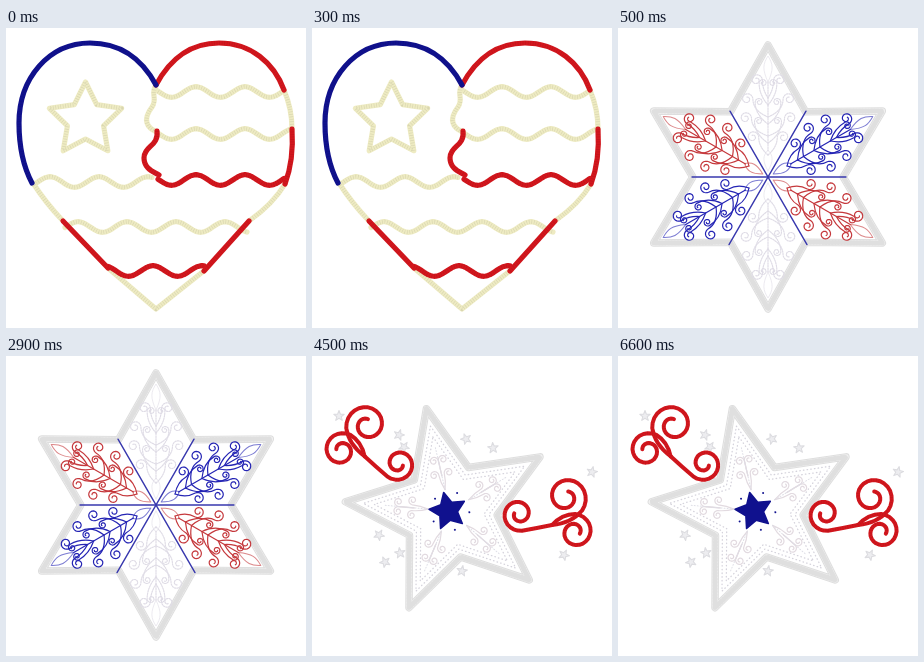
Write an HTML page that moves like this. It is 300 by 300 pixels and loops after 8 s.

```html
<!DOCTYPE html>
<html lang="en">
<head>
<meta charset="utf-8">
<title>Stitched hearts and stars</title>
<style>
  html, body { margin: 0; width: 100%; height: 100%; overflow: hidden; background: #fff; }
  svg { display: block; width: 100%; height: 100%; }
  path { fill: none; stroke-linecap: round; stroke-linejoin: round; }
  .slide { visibility: hidden; animation: 8s step-end infinite; }
  #heart { animation-name: first; }
  #snow { animation-name: second; }
  #star { animation-name: third; }
  @keyframes first { 0% { visibility: visible; } 6.25%, 100% { visibility: hidden; } }
  @keyframes second { 0% { visibility: hidden; } 6.25% { visibility: visible; } 56.25%, 100% { visibility: hidden; } }
  @keyframes third { 0% { visibility: hidden; } 56.25%, 100% { visibility: visible; } }
</style>
</head>
<body>
<svg viewBox="0 0 300 300">
  <g id="heart" class="slide"></g>
  <g id="snow" class="slide"></g>
  <g id="star" class="slide"></g>
</svg>
<script>
const RED = '#d3161d', BLUE = '#10118e', CREAM = '#eeebc2';
const byId = id => document.getElementById(id);
const rad = degrees => degrees * Math.PI / 180;

function add(parent, tag, attrs) {
  const node = document.createElementNS('http://www.w3.org/2000/svg', tag);
  for (const key in attrs) node.setAttribute(key, attrs[key]);
  return parent.appendChild(node);
}
const draw = (parent, d, stroke, width, more) =>
  add(parent, 'path', { d, stroke, 'stroke-width': width, ...more });

const polyline = points =>
  'M' + points.map(([x, y]) => x.toFixed(1) + ' ' + y.toFixed(1)).join('L');

// Satin stitch: a solid line with faint cross threads.
function satin(parent, d, color, width) {
  draw(parent, d, color, width);
  draw(parent, d, '#000', width * .8,
    { 'stroke-dasharray': '.7 1.8', 'stroke-opacity': .09, style: 'stroke-linecap:butt' });
}

function wave(x0, x1, y, crest) {
  const points = [];
  for (let x = x0; x <= x1; x += 2)
    points.push([x, y - 5.3 * Math.cos((x - crest) * 2 * Math.PI / 49)]);
  return polyline(points);
}

// A stem from (x, y) that bends into a spiral around (cx, cy).
function curl(x, y, cx, cy, r, degrees, dir, turns = 1.3) {
  const a0 = rad(degrees);
  const sx = cx + r * Math.cos(a0), sy = cy + r * Math.sin(a0);
  const reach = Math.hypot(sx - x, sy - y) * .5;
  const qx = sx + dir * Math.sin(a0) * reach, qy = sy - dir * Math.cos(a0) * reach;
  const spiral = Array.from({ length: 33 }, (_, i) => {
    const t = i / 32, a = a0 + dir * t * turns * 2 * Math.PI, k = r * (1 - .72 * t);
    return [cx + k * Math.cos(a), cy + k * Math.sin(a)];
  });
  return `M${x} ${y}Q${qx} ${qy} ${sx} ${sy}` + polyline(spiral).replace('M', 'L');
}

function starPath(cx, cy, r, inner, turn = 0, tips = 5) {
  const points = Array.from({ length: tips * 2 }, (_, i) => {
    const a = rad(turn - 90 + i * 180 / tips), k = i % 2 ? r * inner : r;
    return [cx + k * Math.cos(a), cy + k * Math.sin(a)];
  });
  return polyline(points) + 'Z';
}

const drop = (from, to) => {
  const mid = (from + to) / 2;
  return `M0 ${-from}C-6 ${-mid} -5 ${-mid - 5} 0 ${-to}C5 ${-mid - 5} 6 ${-mid} 0 ${-from}`;
};

// Pale padded border with a thread texture.
function border(parent, d) {
  draw(parent, d, '#dedede', 7.5);
  draw(parent, d, '#f1f1f1', 5.5);
  draw(parent, d, '#dfdfdf', 5, { 'stroke-dasharray': '.5 2.6' });
}

function buildHeart(g) {
  const line = (d, color) => satin(g, d, color, 5.2);
  line(starPath(79.5, 92, 38, .5), CREAM);
  line(wave(28, 147, 154, 44), CREAM);
  line(wave(150, 279, 64, 190), CREAM);
  line(wave(150, 285, 106, 190), CREAM);
  line(wave(59, 241, 199, 121), CREAM);
  line('M27 155Q39 174 57 193M102 240L150 281L199 242M243 193Q267 176 279 156', CREAM);
  line('M278 62Q286 81 286 101', CREAM);
  line('M150 57C144 66 152 70 146 79C136 92 141 100 151 104', CREAM);
  line('M57 193L102 240M198 243L243 193', RED);
  line(wave(102, 198, 243, 147), RED);
  line('M151 103C153 118 138 118 138 130C138 140 146 143 153 147', RED);
  line(wave(152, 279, 152, 190), RED);
  line('M286 101Q288 132 279 156', RED);
  line('M150 57C165 29 187 15 213 15C245 15 268 35 278 62', RED);
  line('M150 57C135 29 112 15 84 15C43 15 13 50 13 95C13 115 17 138 26 155', BLUE);
}

function buildSnow(g) {
  border(g, starPath(150, 149, 132, .57, 0, 6));
  const pale = '#dfdce6', blue = '#2424b4', red = '#c5383c';
  [pale, blue, red, pale, blue, red].forEach((color, i) => {
    const petal = add(g, 'g', { transform: `translate(150 149) rotate(${i * 60})` });
    const dash = color === pale ? { 'stroke-dasharray': '1.4 1.2' } : {};
    const line = d => draw(petal, d, color, 1.2, dash);
    for (const side of [1, -1]) {
      const inward = side > 0 ? 180 : 0;
      for (let k = 0; k < 4; k++) {
        const up = 40 + k * 19;
        const out = 23 * Math.sin(Math.PI * (up - 18) / 95);
        line(curl(0, 18 - up, side * out, -up, 6, inward, side));
        if (k) line(curl(0, 25 - up, side * out * .42, 3 - up, 4, 180 - inward, -side));
      }
    }
    line('M0 -26V-95');
    for (const d of [drop(6, 27), drop(95, 121)])
      draw(petal, d, color, 1, { 'stroke-opacity': .6 });
  });
  for (let i = 0; i < 3; i++)
    draw(g, 'M-76 0H78', '#3838ae', 1.4, { transform: `translate(150 149) rotate(${i * 60})` });
}

function scroll(g, transform) {
  const motif = add(g, 'g', { transform });
  satin(motif, curl(-14, 28, -47, 17, 17, 80, 1), RED, 4);
  satin(motif, curl(-14, 28, 0, 0, 21, 40, -1), RED, 4);
  satin(motif, curl(-14, 28, 9, 35, 18, 270, 1), RED, 4);
}

function buildStar(g) {
  const cx = 138, cy = 155, turn = -13;
  border(g, starPath(cx, cy, 105, .45, turn));
  for (const r of [87, 76])
    draw(g, starPath(cx, cy, r, .45, turn), '#d5d3dc', 1.3, { 'stroke-dasharray': '.5 3.2' });

  for (let i = 0; i < 5; i++) {
    const arm = add(g, 'g', { transform: `translate(${cx} ${cy}) rotate(${turn + i * 72})` });
    for (const side of [1, -1])
      for (const up of [38, 52])
        draw(arm, curl(0, 16 - up, side * (15 - up / 5), -up, 4.5, side > 0 ? 180 : 0, side), '#e2dae0', 1.2);
    draw(arm, 'M0 -22V-66', '#dedee6', 1, { 'stroke-dasharray': '1 2' });
    add(arm, 'circle', { cx: 11, cy: -16, r: 1, fill: BLUE });
  }
  draw(g, starPath(136, 155, 19, .5, turn), BLUE, 1.6, { style: `fill:${BLUE}` });

  const sparks = [
    [27, 60], [87, 79], [92, 91], [154, 83], [181, 92], [280, 116],
    [67, 179], [73, 206], [88, 197], [150, 215], [252, 199]
  ];
  sparks.forEach(([x, y], i) =>
    draw(g, starPath(x, y, 5.5, .42, i * 17), '#dcdce0', 1.1, { style: 'fill:#ededf0' }));

  scroll(g, 'translate(254 141)');
  scroll(g, 'translate(55 69) rotate(31) scale(-1 1)');
}

buildHeart(byId('heart'));
buildSnow(byId('snow'));
buildStar(byId('star'));
</script>
</body>
</html>
```
